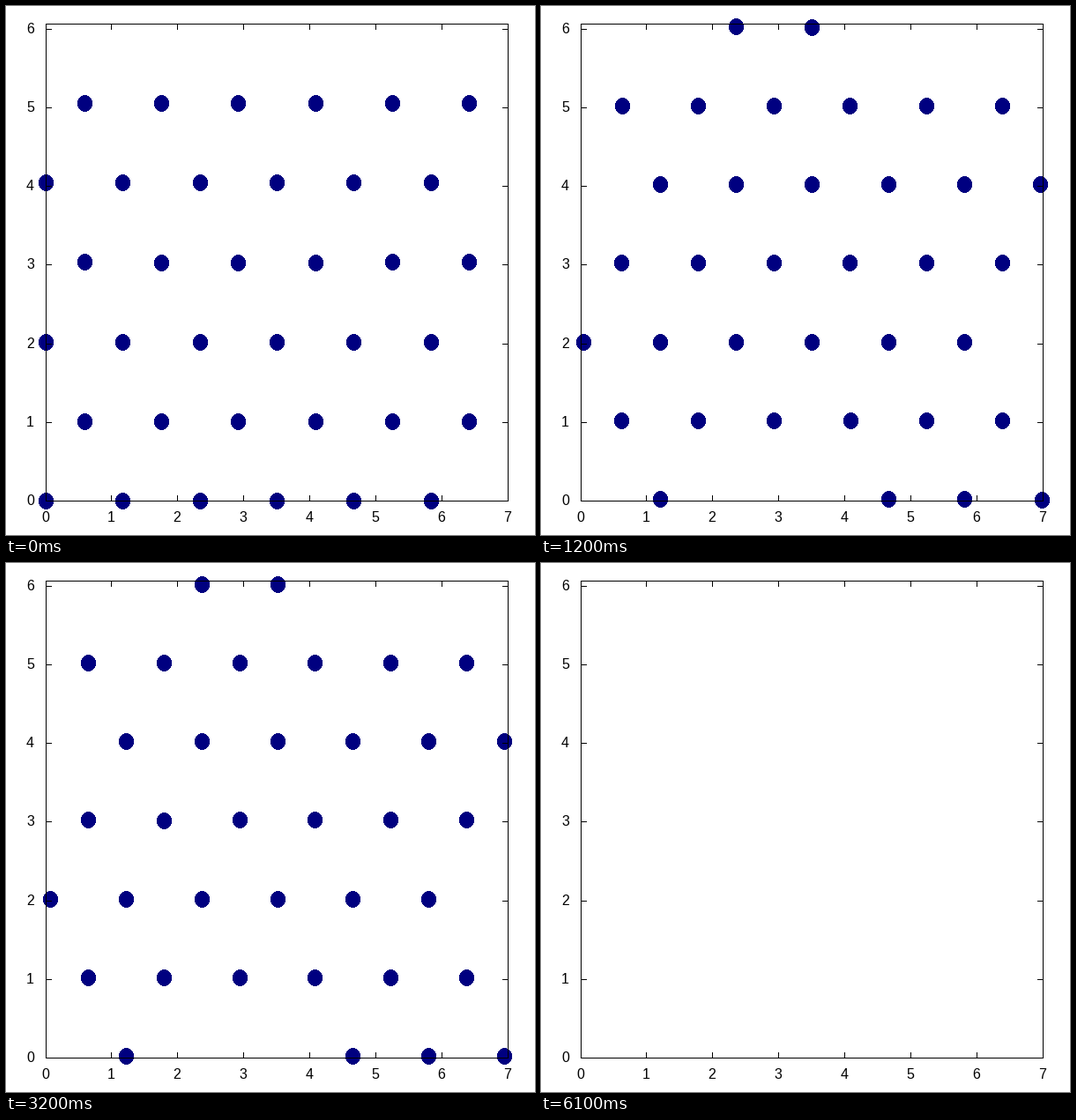
Write a matplotlib script that moves like this. It is 600 px wide and 600 px high and loops after 6.2 s.

```python
import numpy as np
import matplotlib.pyplot as plt
from matplotlib.animation import FuncAnimation
from matplotlib.patches import Ellipse

SIZE, DPI = 600, 100
FRAMES, STEP = 62, 100
LEFT, RIGHT, TOP, BOTTOM = 45, 569, 20, 561
W, H = RIGHT - LEFT, BOTTOM - TOP
N = 6                      # particles per row, and rows
GAP_X, GAP_Y = 85.65, 89.22  # spacing of the relaxed lattice
PX = 72 / DPI

fig = plt.figure(figsize=(SIZE / DPI, SIZE / DPI), dpi=DPI, facecolor="white")
ax = fig.add_axes([0, 0, 1, 1])
ax.set_xlim(0, SIZE)
ax.set_ylim(SIZE, 0)
ax.axis("off")


def line(xs, ys):
    ax.plot(np.array(xs) + 0.5, np.array(ys) + 0.5, color="black", lw=PX,
            snap=False, solid_capstyle="projecting",
            solid_joinstyle="miter", zorder=3)


def label(x, y, n, ha):
    ax.text(x, y, str(n), ha=ha, va="baseline", color="black",
            family="Liberation Sans", fontsize=16 * PX)


def draw_axes():
    line([LEFT, RIGHT, RIGHT, LEFT, LEFT], [TOP, TOP, BOTTOM, BOTTOM, TOP])
    for n in range(8):
        x = int(LEFT + n * W / 7)
        line([x, x], [BOTTOM, BOTTOM - 6])
        line([x, x], [TOP, TOP + 6])
        label(x, 585, n, "center")
    for n in range(7):
        y = round(BOTTOM - n * 89.2)
        line([LEFT, LEFT + 6], [y, y])
        line([RIGHT, RIGHT - 6], [y, y])
        label(32, y + 5, n, "right")


row, col = np.mgrid[0:N, 0:N]
shift = row % 2 / 2
corner = (row == 0) & (col == 0)

# a triangular lattice fills the periodic box, then contracts
x0 = LEFT + (col + shift) * W / N
y0 = BOTTOM - row * H / N
x1 = 50.6 + (col + shift) * GAP_X
y1 = 559.1 - row * GAP_Y

# particles that join the neighbouring cell across an edge
leftward = (col == 0) & np.isin(row, (0, 4))
downward = (row == 0) & np.isin(col, (2, 3))
x1 += leftward * (N * GAP_X - W)
y1 += downward * (H - N * GAP_Y)


def positions(t):
    # the corner particle lets go later than the rest
    age = np.maximum(t - 8 * corner, 0)
    x = x0 + (x1 - x0) * (1 - np.exp(-(age / 13) ** 1.3))
    y = y0 + (y1 - y0) * (1 - np.exp(-age / 5))
    x = np.where(x < LEFT, x + W, x)
    y = np.where(y > BOTTOM, y - H, y)
    noise = np.random.default_rng(t).normal(0, 0.05, (2, N, N))
    return np.round(x + noise[0]), np.round(y + noise[1])


draw_axes()
dots = [ax.add_patch(Ellipse((0, 0), 16.6, 17.3, facecolor="#000080",
                             edgecolor="none", lw=0, antialiased=False,
                             zorder=2))
        for _ in range(N * N)]


def update(t):
    x, y = positions(t)
    for dot, px, py in zip(dots, x.flat, y.flat):
        dot.set_center((px + 0.5, py + 0.5))
        dot.set_visible(t < FRAMES - 1)
    return dots


anim = FuncAnimation(fig, update, frames=FRAMES, interval=STEP,
                     repeat=True, repeat_delay=0, blit=False)
plt.show()
```
